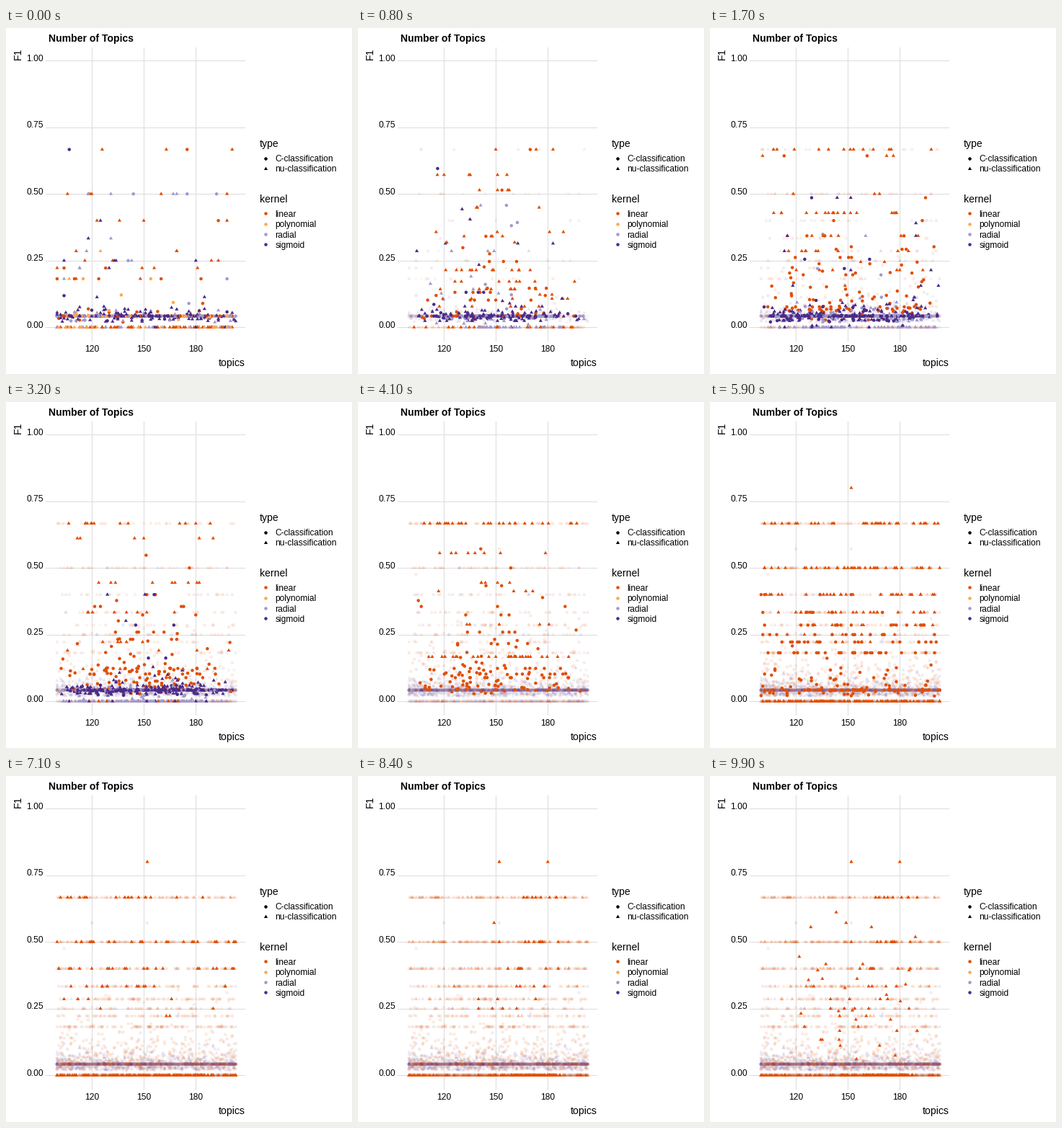
A matplotlib script for the animation above (10000 ms loop, 480 by 480 pixels).

```python
import math

import numpy as np
import matplotlib.pyplot as plt
from matplotlib.animation import FuncAnimation
from matplotlib.colors import to_rgb

plt.rcParams["font.family"] = "Liberation Sans"
rng = np.random.default_rng(12)

COLORS = {"linear": "#e14e02", "polynomial": "#fda950",
          "radial": "#a09acb", "sigmoid": "#4b2a88"}
MARKS = {"o": dict(marker="o", s=10.4), "^": dict(marker=(3, 0, 0), s=18.5)}
LEVELS = (2 / 3, 1 / 2, 2 / 5, 1 / 3, 2 / 7, 1 / 4, 2 / 9, 2 / 11)
BASE = 0.042
FRAMES = 100


def px(x):
    return 119 + (np.asarray(x) - 120) * 2.405


def py(y):
    return 415.2 - np.asarray(y) * 370


def group(counts=(), zeros=0, base=0, cloud=0, spread=0.03, keys=(), mid=None):
    """Rows of (topics, F1, stacking order): score levels, zeros, base line, cloud.

    With mid set, the rows gather round that number of topics.
    """
    y = np.concatenate([np.repeat(LEVELS[:len(counts)], counts), np.zeros(zeros),
                        np.full(base, BASE),
                        0.018 + rng.gamma(1.6, spread / 1.6, cloud)])
    if mid is None:
        x = rng.integers(100, 204, len(y))
    else:
        x = np.clip(rng.normal(mid, 10, len(y)).round(), 140, 190)
    pts = np.vstack([np.reshape(keys, (-1, 2)), np.column_stack([x, y])])
    return np.column_stack([pts, rng.random(len(pts))])


def shuffled(rows):
    return rows[rng.permutation(len(rows))]


# Four kernels compete first; the linear one takes over and then converges.
STATES = [
    {"linear ^": group((3, 6, 4, 0, 3, 4, 4, 2), zeros=65),
     "linear o": group((1, 0, 1, 0, 0, 0, 2, 5), base=25, cloud=10, spread=.04),
     "polynomial ^": group((0, 0, 0, 0, 1, 0, 0, 1), zeros=45, cloud=4),
     "polynomial o": group((0, 0, 0, 0, 0, 0, 0, 2), base=70, cloud=10),
     "radial ^": group((0, 4, 0, 1, 1, 1, 2, 1), zeros=30, cloud=18),
     "radial o": group((0, 3, 0, 0, 0, 1, 0, 1), base=60, cloud=8),
     "sigmoid ^": group((0, 0, 1, 1, 0, 4, 1), zeros=5, base=10, cloud=80),
     "sigmoid o": group(base=60, cloud=15, spread=.02, keys=[(107, 2 / 3)])},
    {"linear ^": group((16, 22, 8, 9, 2, 6, 0, 5), zeros=60),
     "linear o": group((2, 1, 2, 3, 5, 4, 2, 6), base=30, cloud=55, spread=.09),
     "radial ^": group((0, 0, 1), zeros=50, cloud=30),
     "radial o": group((0, 0, 1, 0, 0, 1, 1), base=70, cloud=35),
     "sigmoid ^": group((0, 2, 3, 1, 0, 2, 0, 3), zeros=12, base=20, cloud=95),
     "sigmoid o": group((0, 1, 0, 0, 0, 3), base=110, cloud=40)},
    {"linear ^": group((13, 6), zeros=45),
     "linear o": group((0, 2, 8, 12, 10, 6, 8, 8), base=25, cloud=75, spread=.08),
     "radial ^": group(zeros=90, cloud=25),
     "radial o": group(base=90, cloud=20),
     "sigmoid ^": group((0, 0, 2, 1), zeros=15, base=25, cloud=110),
     "sigmoid o": group((0, 0, 1, 0, 2), base=110, cloud=40, spread=.02)},
    {"linear ^": group((28, 8, 0, 5, 4, 0, 0, 5), zeros=30),
     "linear o": group((0, 1, 2, 4, 3, 0, 5, 5), base=30, cloud=80, spread=.08,
                       keys=[(152, 4 / 7)]),
     "radial ^": group(zeros=100, cloud=20),
     "radial o": group(base=90, cloud=15),
     "sigmoid ^": group((0, 0, 2, 0, 1), zeros=10, base=25, cloud=110),
     "sigmoid o": group((0, 0, 1, 0, 2, 0, 2), base=110, cloud=30, spread=.02)},
    {"linear ^": group((44, 36, 15, 13, 6, 4), zeros=120, keys=[(152, 2 / 3)]),
     "linear o": group((0, 4, 6, 6, 12, 2, 9, 16), base=75, cloud=150, spread=.04,
                       keys=[(120, 4 / 7)])},
    {"linear ^": group((36, 36, 28, 24, 12, 8, 4), zeros=110, keys=[(152, .8)]),
     "linear o": group((0, 0, 4, 8, 14, 12, 20, 30), base=30, cloud=70, spread=.05)},
    {"linear ^": group((16, 28, 22, 13, 4, 2, 2), zeros=130, keys=[(152, .8)])},
    {"linear ^": np.vstack([
        group((9, 9, 8, 4), zeros=60, mid=168,
              keys=[(152, .8), (180, .8), (149, 4 / 7)]),
        group((0, 0, 0, 0, 3, 4), mid=152), group(zeros=30)])},
    {"linear ^": np.vstack([
        shuffled(group((3, 6, 3, 6, 4, 4, 4, 8), mid=165)), group(zeros=26)])},
]
N = len(STATES)
SHADOW = [0.1] * 4 + [0.13] * 2 + [0.3, 1, 0]

# Each generation rests for half of its share of the loop, then moves on.
STEP = (FRAMES + 0.8) / N
STARTS = [math.ceil(k * STEP - 0.1) for k in range(N + 1)]
HOLDS = [math.floor((k + 0.5) * STEP) for k in range(N)]


def collect(groups, mark):
    """Offsets and colours of all rows with one marker, in stacking order."""
    rows, cols = [np.empty((0, 3))], [np.empty((0, 3))]
    for name, a in groups.items():
        kernel, m = name.split()
        if m == mark:
            rows.append(a)
            cols.append(np.tile(to_rgb(COLORS[kernel]), (len(a), 1)))
    rows, cols = np.vstack(rows), np.vstack(cols)
    order = np.argsort(rows[:, 2])
    rows, cols = rows[order], cols[order]
    return np.column_stack([px(rows[:, 0]), py(rows[:, 1])]), cols


def blend(a, b, p):
    """Move matching rows linearly; rows without a partner drop out."""
    out = {}
    for name in a:
        if name in b:
            m = min(len(a[name]), len(b[name]))
            out[name] = a[name][:m].copy()
            out[name][:, :2] += (b[name][:m, :2] - a[name][:m, :2]) * p
    return out


fig = plt.figure(figsize=(4.8, 4.8), dpi=100, facecolor="white")
ax = fig.add_axes([0, 0, 1, 1])
ax.set(xlim=(0, 480), ylim=(480, 0))
ax.axis("off")


def label(x, y, s, size=12, **kw):
    ax.text(x, y, s, fontsize=size * 0.72, color="black", va="baseline", **kw)


def dots(mark, xy, cols, **kw):
    xy = np.reshape(xy, (-1, 2))
    return ax.scatter(xy[:, 0], xy[:, 1], c=cols, linewidths=0, **MARKS[mark], **kw)


def grid(xs, ys):
    ax.plot(xs, ys, color="#dedede", lw=0.8, zorder=0)


for v in (0, 0.25, 0.5, 0.75, 1):
    grid([55, 331], [py(v)] * 2)
    label(52, py(v) + 0.6, f"{v:.2f}", ha="right")
for v in (120, 150, 180):
    grid([px(v)] * 2, [26.5, 433.5])
    label(px(v), 449, str(v), ha="center")

label(59, 19, "Number of Topics", 14, weight="bold")
label(331.6, 469, "topics", 14, ha="right")
label(21, 27.5, "F1", 14, ha="right", rotation=90, rotation_mode="anchor")

label(352, 165, "type", 14)
for y, mark, name in ((181, "o", "C-classification"), (195, "^", "nu-classification")):
    dots(mark, (359.5, y), ["black"])
    label(373.5, y + 4.4, name)
label(352, 242, "kernel", 14)
for i, (name, color) in enumerate(COLORS.items()):
    y = 257.3 + 14.3 * i
    dots("o", (359.5, y), [color])
    label(373.5, y + 4.6, name)

shadows = [[dots(m, *collect(s, m), alpha=a, zorder=2 + k / 10) for m in MARKS]
           for k, (s, a) in enumerate(zip(STATES, SHADOW))]
live = {m: dots(m, *collect(STATES[0], m), zorder=4) for m in MARKS}


def update(f):
    i = max(k for k in range(N) if STARTS[k] <= f)
    p = max(0, f - HOLDS[i]) / (STARTS[i + 1] - HOLDS[i])
    now = blend(STATES[i], STATES[(i + 1) % N], p) if p else STATES[i]
    for k, pair in enumerate(shadows):
        for c in pair:
            c.set_visible(k < i or (k == i and p > 0))
    for m, c in live.items():
        xy, cols = collect(now, m)
        c.set_offsets(xy)
        c.set_facecolor(cols)
    return list(live.values())


anim = FuncAnimation(fig, update, frames=FRAMES, interval=100, repeat=True,
                     repeat_delay=0, init_func=lambda: update(0), blit=False)
plt.show()
```
